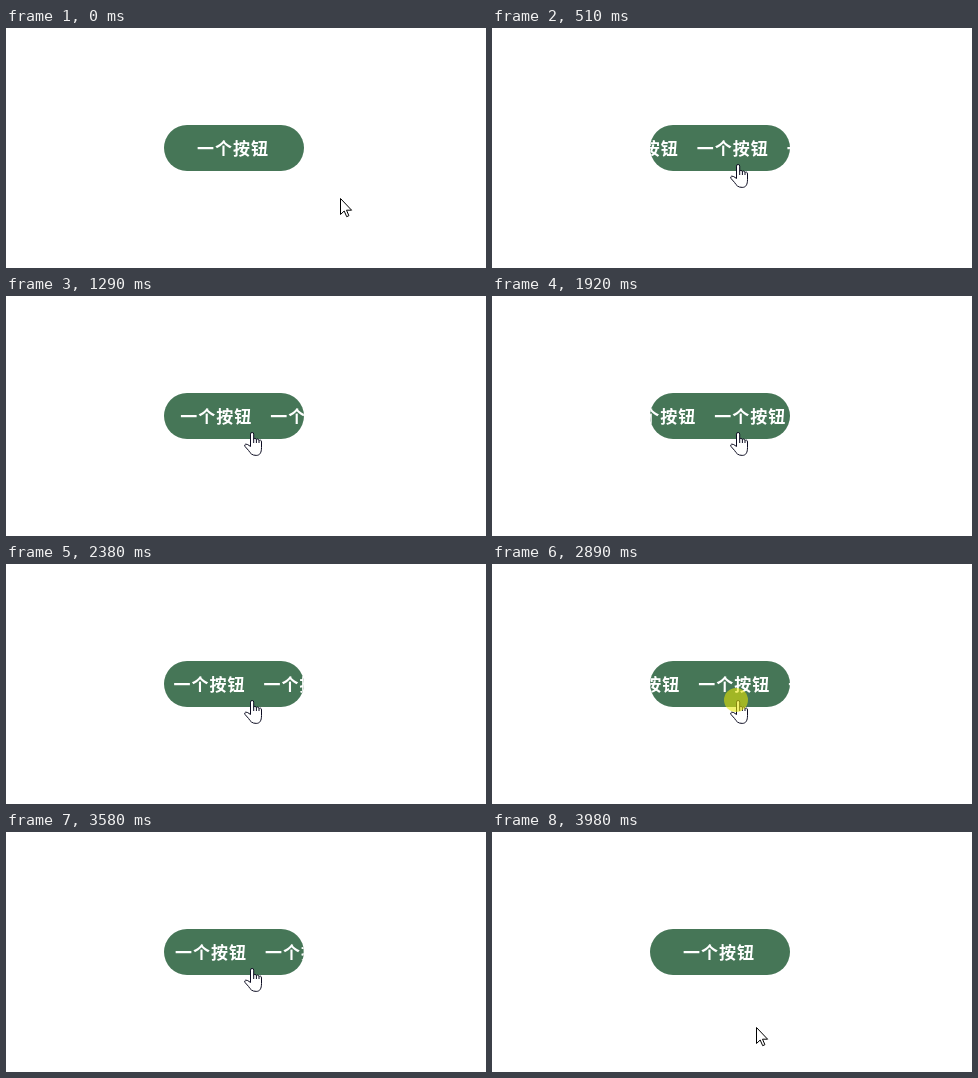
Write an HTML page that moves like this. It is 480x240 px and loops after 4.03 s.

```html
<!DOCTYPE html>
<html lang="zh-CN">
<head>
<meta charset="utf-8">
<title>一个按钮</title>
<style>
  html, body {
    margin: 0;
    width: 100%;
    height: 100%;
    overflow: hidden;
    background: #fff;
  }
  body { position: relative; }

  .button {
    position: absolute;
    left: 158px;
    top: 97px;
    width: 140px;
    height: 46px;
    border-radius: 23px;
    overflow: hidden;
    background: #467657;
  }
  .label {
    position: absolute;
    left: 33px;
    top: 0;
    color: #fff;
    font: bold 17px/45px "Noto Sans CJK SC", "Noto Sans CJK", sans-serif;
    letter-spacing: 1px;
    white-space: nowrap;
    animation: slide 4030ms linear infinite, copies 4030ms step-end infinite;
  }

  svg {
    position: absolute;
    left: 0;
    top: 0;
    width: 24px;
    height: 28px;
    overflow: visible;
    fill: #fff;
    stroke: #0b0b20;
    stroke-linejoin: round;
  }
  .pointer {
    position: absolute;
    left: 0;
    top: 0;
    animation: travel 4030ms infinite;
  }
  .arrow { stroke: #000; animation: away 4030ms step-end infinite; }
  .hand { animation: over 4030ms step-end infinite; }

  .click {
    position: absolute;
    left: 232px;
    top: 124px;
    width: 24px;
    height: 24px;
    border-radius: 50%;
    background: rgba(230, 230, 0, .57);
    animation: press 4030ms step-end infinite;
  }

  /* three 90px laps while hovered */
  @keyframes slide {
    0%, 8.19% { transform: translateX(0); }
    96.03% { transform: translateX(270px); }
    96.031%, 100% { transform: translateX(0); }
  }
  @keyframes copies {
    0%, 96.03%, 100% { text-shadow: none; }
    8.19% { text-shadow: 90px 0 #fff, -90px 0 #fff, -180px 0 #fff, -270px 0 #fff, -360px 0 #fff; }
  }
  @keyframes travel {
    0%, .74% { transform: translate(334px, 170px); animation-timing-function: ease-in-out; }
    10.67%, 95.04% { transform: translate(244px, 136px); animation-timing-function: ease-in-out; }
    98.76%, 100% { transform: translate(264px, 195px); }
  }
  @keyframes over {
    0%, 96.03%, 100% { opacity: 0; }
    8.19% { opacity: 1; }
  }
  @keyframes away {
    0%, 96.03%, 100% { opacity: 1; }
    8.19% { opacity: 0; }
  }
  @keyframes press {
    0%, 84.4%, 100% { opacity: 0; }
    68.98% { opacity: 1; }
  }
</style>
</head>
<body>
  <div class="button"><span class="label">一个按钮</span></div>
  <div class="pointer">
    <svg class="arrow"><path d="M.5 .5V16.5L4.2 13 6.7 18.7 8.9 17.7 6.5 12.2H11.6Z"/></svg>
    <svg class="hand">
      <path d="M.5 14.5V2.1a1.6 1.6 0 0 1 3.2 0V7.2Q4 6.2 5.1 6.4 6.3 6.6 6.4 7.8 6.8 6.8 7.8 7 8.9 7.3 9 8.6 9.4 7.8 10.3 8 11.5 8.4 11.5 10V15.5C11.5 20.5 10 23.4 6.2 23.4 2 23.4 .5 21.5-1.4 18.5L-4.9 14.6Q-6 12.6-4.3 12.1-2.6 11.9 .5 14.5Z"/>
      <path fill="none" d="M3.7 7V11M6.4 7.8V11M9 8.6V11"/>
    </svg>
  </div>
  <div class="click"></div>
</body>
</html>
```
